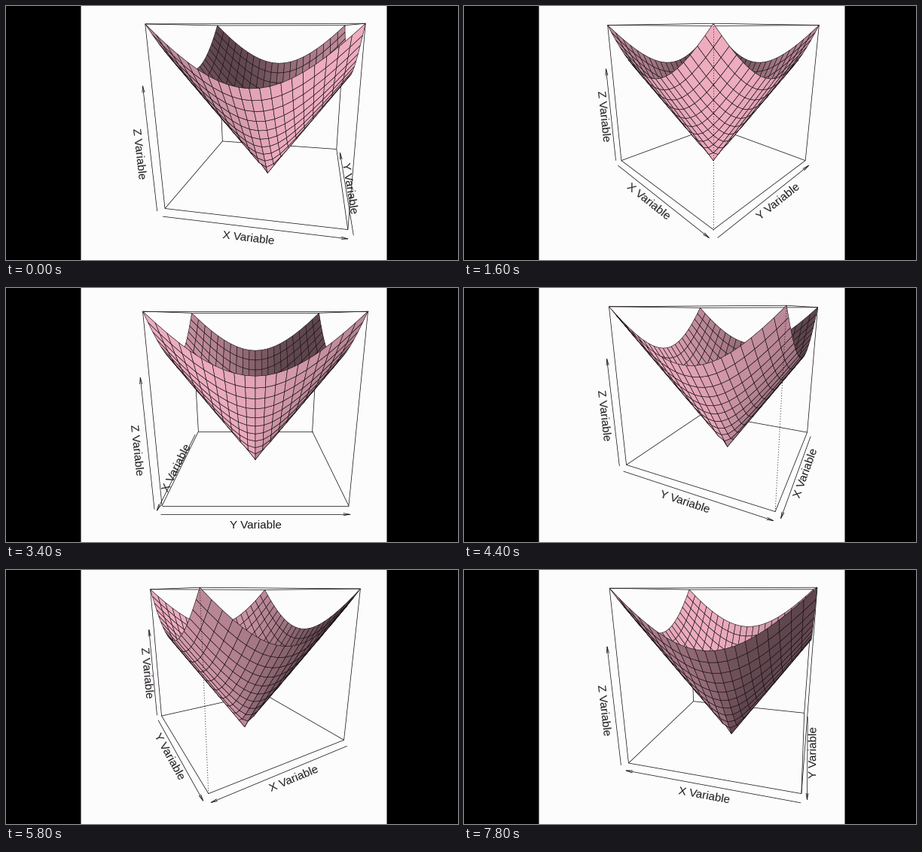
Animation, 600 px wide and 338 px high, one loop 8000 ms. Source, as a matplotlib script:

```python
import itertools

import matplotlib.pyplot as plt
import numpy as np
from matplotlib.animation import FuncAnimation
from matplotlib.collections import LineCollection, PolyCollection
from matplotlib.patches import Rectangle

W, H, DPI = 600, 338, 100
FRAMES, INTERVAL = 40, 200
PX = 72 / DPI                       # one pixel in points
CENTER = np.array([331.0, 160.4])   # middle of the plot region
REGION_W, REGION_H = 299.0, 273.0
ASPECT = 1.005                      # slight vertical stretch of the picture
PHI = np.radians(15)
EYE = 1 + 1 + np.sqrt(3)            # eye distance from the box centre
TICK, LABEL = 0.06, 0.135           # arrow and label offsets from the box
LABEL_LIFT = np.array([0, -1.6])
HEAD, HEAD_ANGLE = 9.0, np.radians(10)
PINK = np.array([247, 179, 199]) / 255
SHADE = 0.4
INK = "#141014"
CELLS = 20

fig = plt.figure(figsize=(W / DPI, H / DPI), dpi=DPI, facecolor="black")
ax = fig.add_axes([0, 0, 1, 1])
ax.set_xlim(0, W)
ax.set_ylim(H, 0)
ax.axis("off")
ax.add_patch(Rectangle((99.5, -1), 406, H + 2, fc="#fdfcfd", ec="none",
                       zorder=0, snap=False))

# Cone over a square grid, scaled to the cube [-1, 1]
g = np.linspace(-1, 1, CELLS + 1)
gx, gy = np.meshgrid(g, g, indexing="ij")
gz = np.sqrt(2) * np.hypot(gx, gy) - 1
grid = np.stack([gx, gy, gz], axis=-1)
quads = np.stack([grid[:-1, :-1], grid[1:, :-1], grid[1:, 1:], grid[:-1, 1:]],
                 axis=2).reshape(-1, 4, 3)


def shade(q):
    """Facet colours under a fixed horizontal light."""
    n = np.cross(q[:, 1] - q[:, 3], q[:, 2] - q[:, 0])
    n /= np.linalg.norm(n, axis=1, keepdims=True)
    light = np.array([-1, 1, 0]) / np.sqrt(2)
    return np.clip(0.5 * (n @ light + 1), 0, 1)[:, None] ** SHADE * PINK


colors = shade(quads)

corners = np.array(list(itertools.product((-1, 1), repeat=3)), float)
edges = [(a, b) for a, b in itertools.combinations(corners, 2)
         if np.count_nonzero(a != b) == 1]


def project(p, theta):
    """Perspective coordinates and depth of points in the cube."""
    p = np.asarray(p, float)
    x, y, z = p[..., 0], p[..., 1], p[..., 2]
    c, s = np.cos(theta), np.sin(theta)
    side, near = x * c + y * s, x * s - y * c
    up = z * np.cos(PHI) - near * np.sin(PHI)
    w = EYE - z * np.sin(PHI) - near * np.cos(PHI)
    return np.stack([side / w, up / w], axis=-1), w


def make_view(theta):
    """Fit the projected box into the plot region."""
    box, _ = project(corners, theta)
    lo, hi = box.min(axis=0), box.max(axis=0)
    scale = min(REGION_W / (hi[0] - lo[0]), REGION_H / (hi[1] - lo[1]))
    mid = (lo + hi) / 2

    def to_screen(p):
        flat = project(p, theta)[0] - mid
        return CENTER + flat * [scale, -scale * ASPECT]
    return to_screen


def split_edges(theta):
    """Edges between two faces turned to the viewer are dotted."""
    eye = EYE * np.array([np.cos(PHI) * np.sin(theta),
                          -np.cos(PHI) * np.cos(theta), np.sin(PHI)])
    solid, dotted = [], []
    for a, b in edges:
        faces = a == b
        front = np.all((a * eye)[faces] > 1)
        (dotted if front else solid).append((a, b))
    return solid, dotted


def axis_lines(to_screen):
    """Start, end and outward direction for the X, Y and Z arrows."""
    base = corners[corners[:, 2] < 0]
    flat = to_screen(base)
    fx, fy, _ = base[np.argmax(flat[:, 1])]
    lx, ly, _ = base[np.argmin(flat[:, 0])]
    top = np.sqrt(2) - 1            # height of the last round tick value
    return [((-1, fy, -1), (1, fy, -1), (0, fy, -1)),
            ((fx, -1, -1), (fx, 1, -1), (fx, 0, -1)),
            ((lx, ly, -1), (lx, ly, top), (lx, ly, 0))]


def arrow_head(start, tip):
    back = np.arctan2(*(start - tip)[::-1])
    wings = [tip + HEAD * np.array([np.cos(back + t), np.sin(back + t)])
             for t in (HEAD_ANGLE, -HEAD_ANGLE)]
    return [wings[0], tip, wings[1]]


def line_set(z, **kw):
    lines = LineCollection([], colors=INK, zorder=z, **kw)
    ax.add_collection(lines, autolim=False)
    return lines


box_lines = line_set(1, linewidths=0.75 * PX)
arrows = line_set(1, linewidths=0.75 * PX)
front_lines = line_set(3, linewidths=0.95 * PX,
                       linestyles=[(0, (1.0, 2.6))])
surface = PolyCollection([], edgecolors=INK, linewidths=0.6 * PX, zorder=2,
                         joinstyle="round")
ax.add_collection(surface, autolim=False)
labels = [ax.text(0, 0, f"{name} Variable", family="Liberation Sans",
                  size=15.3 * PX, color="#1c1a1c", ha="center",
                  va="center_baseline", rotation_mode="anchor", zorder=1)
          for name in "XYZ"]


def angle(i):
    """Five degrees a step, with a short hold every 28 steps."""
    return np.radians(10 + 5 * (i - (i + 23) // 28))


def update(i):
    theta = angle(i)
    to_screen = make_view(theta)

    solid, dotted = split_edges(theta)
    box_lines.set_segments([to_screen(e) for e in solid])
    front_lines.set_segments([to_screen(e) for e in dotted])

    order = np.argsort(-project(quads, theta)[1].max(axis=1), kind="stable")
    surface.set_verts(to_screen(quads[order]))
    surface.set_facecolor(colors[order])

    segments = []
    for text, (a, b, out) in zip(labels, axis_lines(to_screen)):
        a, b, out = (np.array(v, float) for v in (a, b, out))
        start, tip = to_screen(a + TICK * out), to_screen(b + TICK * out)
        segments += [[start, tip], arrow_head(start, tip)]
        dx, dy = tip - start
        if dx < 0:
            dx, dy = -dx, -dy
        text.set_position(to_screen((a + b) / 2 + LABEL * out) + LABEL_LIFT)
        text.set_rotation(np.degrees(np.arctan2(-dy, dx)))
    arrows.set_segments(segments)
    return [box_lines, arrows, surface, front_lines, *labels]


anim = FuncAnimation(fig, update, frames=FRAMES, init_func=lambda: update(0),
                     interval=INTERVAL, repeat=True, repeat_delay=0)
plt.show()
```
